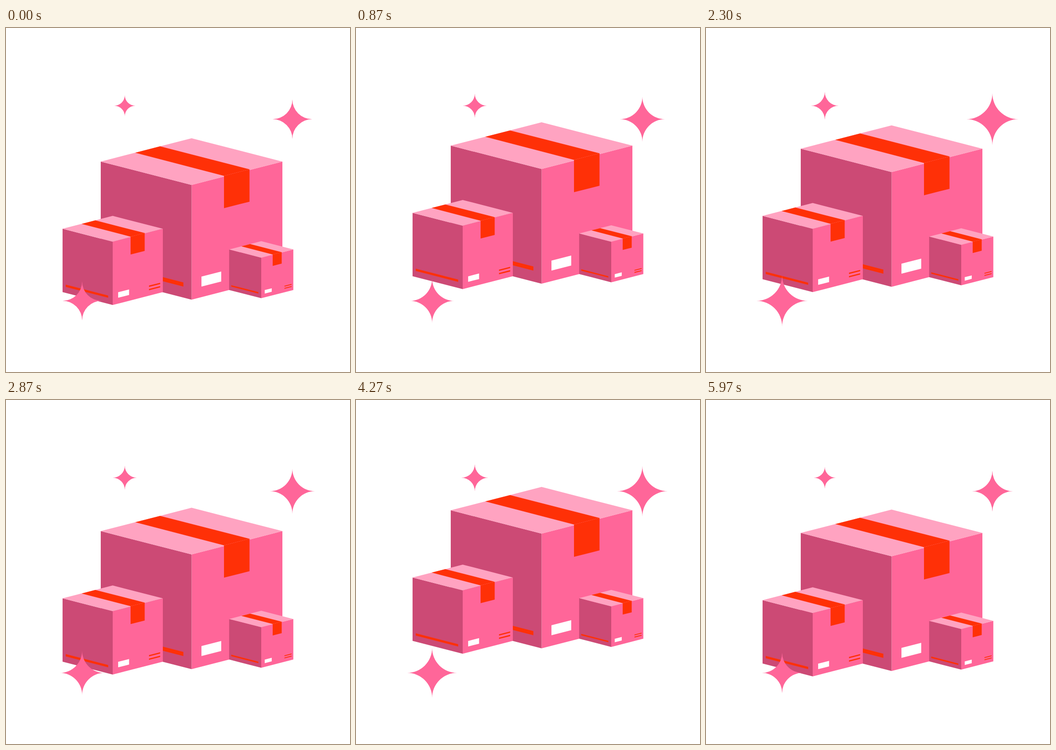
An HTML page for the animation above (6000 ms loop, 748x748 px).

```html
<!DOCTYPE html>
<html lang="en">
<head>
<meta charset="utf-8">
<title>Floating boxes</title>
<style>
  html, body { margin: 0; width: 100%; height: 100%; overflow: hidden; background: #fff; }
  svg { display: block; width: 100vw; height: 100vh; }
</style>
</head>
<body>
<svg viewBox="0 0 748 748">
  <defs>
    <!-- origin: back corner of the lid -->
    <g id="box">
      <path fill="#ff6699" d="M0 101.5 197.5 50.75V300.25L0 351z"/>
      <path fill="#cc4a75" d="M0 101.5-197.5 50.75V300.25L0 351z"/>
      <path fill="#ffa3c1" d="M0 0 197.5 50.75 0 101.5-197.5 50.75z"/>
      <g fill="#ff3007">
        <path d="M-122.5 31.5-68.5 17.6 126 67.5 70.5 81.7z"/>
        <path d="M70.5 81.7 126 67.5V138L70.5 152z"/>
        <path d="M-185 270.5-17.8 313.5V322.5L-185 279.5z"/>
        <path id="dash" d="M143 274.5 187 263.2V268.2L143 279.5z"/>
        <use href="#dash" y="13.4"/>
      </g>
      <path fill="#fff" d="M21.5 300.7 64.5 289.7V311.5L21.5 322.5z"/>
    </g>
    <path id="star" fill="#ff6699"
      d="M0-1A1 1 0 0 0 1 0A1 1 0 0 0 0 1A1 1 0 0 0-1 0A1 1 0 0 0 0-1z"/>
  </defs>
  <g id="boxes">
    <use href="#box" transform="translate(403.5 239.7)"/>
    <use href="#box" transform="translate(232 408.6) scale(.552)"/>
    <use href="#box" transform="translate(555 463.6) scale(.3532)"/>
  </g>
  <g id="stars"></g>
</svg>
<script>
  const FRAMES = 180, FRAME_MS = 100 / 3;
  const boxes = document.getElementById('boxes');
  const layer = document.getElementById('stars');

  // centre x, centre y, largest radius
  const stars = [[258.3, 169, 35], [622.7, 198.3, 65.5], [165.5, 593.3, 64.5]].map(([x, y, r]) => {
    const el = document.createElementNS('http://www.w3.org/2000/svg', 'use');
    el.setAttribute('href', '#star');
    layer.append(el);
    return { el, x, y, r };
  });

  // linear 0 -> 1 -> 0 over one period
  const pingPong = (frame, period) => 1 - Math.abs(1 - 2 * (frame % period) / period);

  function draw() {
    const frame = Math.floor((performance.now() + 4) / FRAME_MS) % FRAMES;
    boxes.setAttribute('transform', `translate(0 ${-60 * pingPong(frame, 90)})`);
    const size = 0.657 + 0.343 * pingPong(frame, 30);
    for (const { el, x, y, r } of stars)
      el.setAttribute('transform', `translate(${x} ${y}) scale(${r * size})`);
    requestAnimationFrame(draw);
  }
  draw();
</script>
</body>
</html>
```
